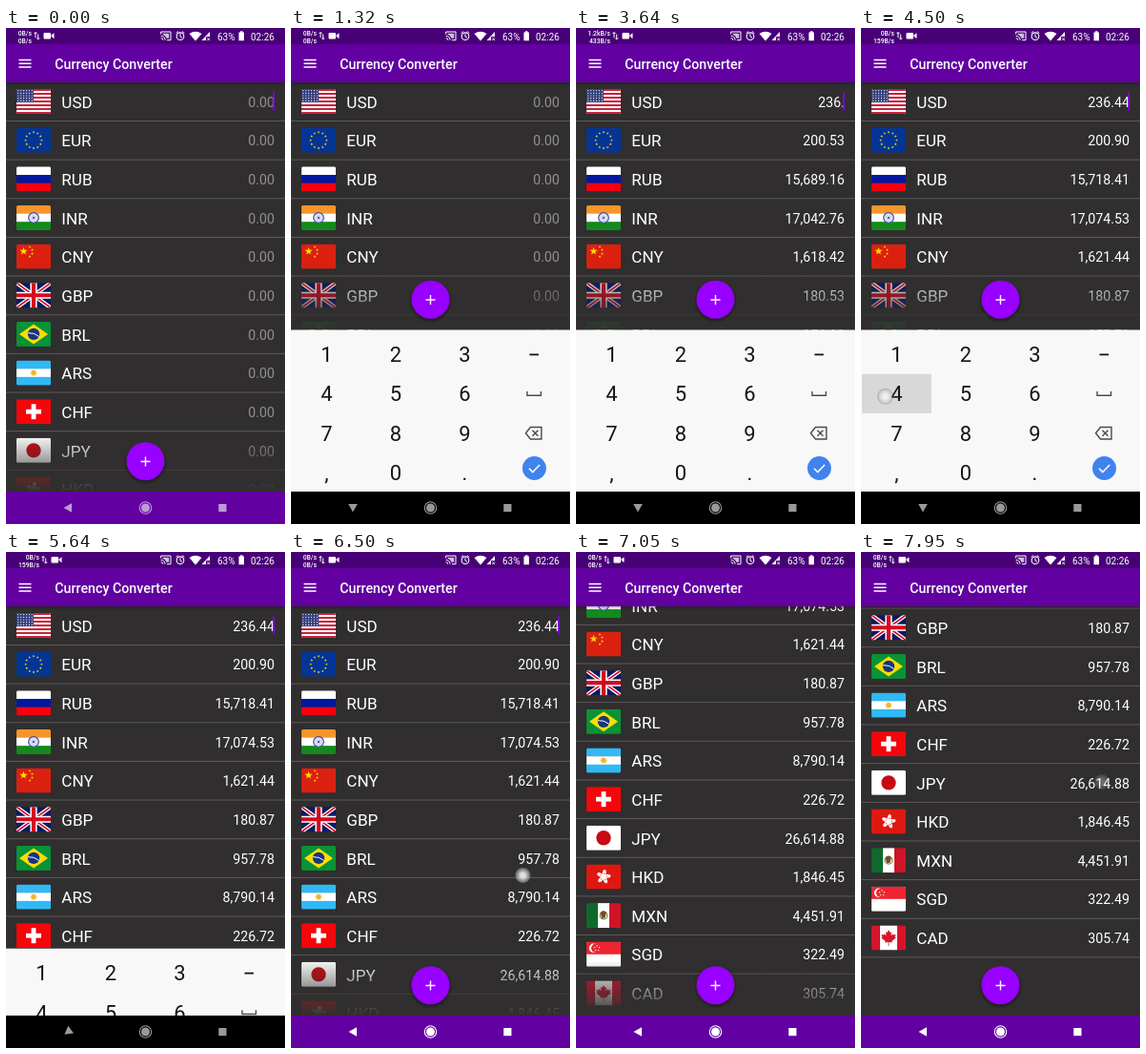
An HTML page for the animation above (8 s loop, 293 by 520 pixels).

```html
<!DOCTYPE html>
<html lang="en">
<head>
<meta charset="utf-8">
<title>Currency Converter</title>
<style>
  html, body { margin: 0; width: 100%; height: 100%; overflow: hidden; background: #302e2e; }
  svg { display: block; width: 100%; height: 100%; }
  text { font-family: Roboto, sans-serif; fill: #fff; }
  .code { font-size: 17.1px; }
  .value { font-size: 14.26px; text-anchor: end; }
  .speed { font-size: 6.8px; font-weight: 500; text-anchor: end; }
  .clock { font-size: 10px; }
  .key { font-size: 22px; text-anchor: middle; fill: #161616; }
  .line { fill: none; stroke: #fff; }
</style>
</head>
<body>
<svg id="stage" viewBox="0 0 293 520" preserveAspectRatio="none"></svg>
<script>
const LOOP = 8000, PITCH = 40.65, TOP = 57, FULL = 486, SHORT = 316.5, MAX_SCROLL = 201;
const TOTAL = 236.44;

// ---- shape helpers
const box = (x, y, w, h, fill, more = '') =>
  `<rect x="${x}" y="${y}" width="${w}" height="${h}" fill="${fill}" ${more}/>`;
const dot = (x, y, r, fill, more = '') => `<circle cx="${x}" cy="${y}" r="${r}" fill="${fill}" ${more}/>`;
const path = (d, fill, more = '') => `<path d="${d}" fill="${fill}" ${more}/>`;
const stroke = (d, color, width) => path(d, 'none', `stroke="${color}" stroke-width="${width}"`);
const range = (n, fn) => Array.from({ length: n }, (_, i) => fn(i)).join('');
const polar = (x, y, r, turn) => [x + r * Math.sin(turn * 2 * Math.PI), y - r * Math.cos(turn * 2 * Math.PI)];
const star = (x, y, r, fill) => `<polygon fill="${fill}" points="${
  range(10, i => polar(x, y, i % 2 ? r * .4 : r, i / 10).map(v => v.toFixed(2)).join() + ' ')}"/>`;
const bands = (a, b, c) => box(0, 0, 36, 9, a) + box(0, 8.7, 36, 9, b) + box(0, 17.3, 36, 9, c);
const pales = (a, b, c, side) =>
  box(0, 0, side, 26, a) + box(side, 0, 36 - 2 * side, 26, b) + box(36 - side, 0, side, 26, c);

const flags = {
  USD: box(0, 0, 36, 26, '#fff') + range(7, i => box(0, i * 4, 36, 2, '#c8233a')) + box(0, 0, 18, 14, '#35417c') +
    range(5, r => range(6, c => dot(1.8 + c * 2.9, 1.6 + r * 2.7, .6, '#fff'))),
  EUR: box(0, 0, 36, 26, '#053594') + range(12, i => star(...polar(18, 13, 8.4, i / 12), 1.5, '#f5d822')),
  RUB: bands('#fff', '#0018a0', '#f20010'),
  INR: bands('#f8952a', '#fff', '#138a1c') + dot(18, 13, 5.3, '#eef', 'stroke="#3a4a9c" stroke-width="1.2"') +
    range(12, i => stroke(`M18 13L${polar(18, 13, 5, i / 12)}`, '#9aa2d0', .4)) + dot(18, 13, 1, '#3a4a9c'),
  CNY: box(0, 0, 36, 26, '#dc2010') + star(7.5, 7.5, 4.3, '#ffdf00') +
    [[14, 2.8], [16.5, 6], [16.5, 10], [14, 13]].map(p => star(...p, 1.5, '#ffdf00')).join(''),
  GBP: box(0, 0, 36, 26, '#0a1a60') + stroke('M0 0L36 26M36 0L0 26', '#fff', 4.2) +
    stroke('M0 0L36 26M36 0L0 26', '#d4081f', 1.6) + stroke('M18 0V26M0 13H36', '#fff', 7.2) +
    stroke('M18 0V26M0 13H36', '#d4081f', 4.2),
  BRL: box(0, 0, 36, 26, '#0a9236') + path('M18 2.5L33 13L18 23.5L3 13Z', '#fedd00') +
    dot(18, 13, 6.2, '#17357f') + stroke('M12 11.8Q18.5 11.2 23.6 15.5', '#fff', 1),
  ARS: bands('#30b9f4', '#fff', '#30b9f4') + dot(18, 13, 2.5, '#f3b52b') +
    range(12, i => stroke(`M18 13L${polar(18, 13, 3.7, i / 12)}`, '#f3b52b', .6)),
  CHF: box(0, 0, 36, 26, '#f4060a') + box(15.6, 5, 4.8, 16, '#fff') + box(10, 10.6, 16, 4.8, '#fff'),
  JPY: box(0, 0, 36, 26, '#fff') + dot(18, 13, 7.7, '#c80a12'),
  HKD: box(0, 0, 36, 26, '#de1810') + range(5, i =>
    `<ellipse cx="18" cy="9.2" rx="1.9" ry="3.7" fill="#fff" transform="rotate(${i * 72 + 10} 18 13)"/>`) +
    range(5, i => dot(...polar(18, 13, 3.4, i / 5 + .03), .6, '#de1810')),
  MXN: pales('#10692c', '#fff', '#cf1428', 12) + dot(18, 13, 3.9, 'none', 'stroke="#6f8f4e" stroke-width="1.2"') +
    path('M14.500 10Q18 6.500 21 10L19.500 15.500L16 16Z', '#7a4a24'),
  SGD: box(0, 0, 36, 26, '#fff') + box(0, 0, 36, 13, '#ee2430') + dot(7.5, 6.5, 4.7, '#fff') +
    dot(9.4, 6.5, 4.4, '#ee2430') + range(5, i => star(...polar(11, 6.7, 2.6, i / 5), 1.1, '#fff')),
  CAD: pales('#d5142c', '#fff', '#d5142c', 9) +
    path('M18 4.500l1.500 3 1.600-.8-.7 4.100 2.200-2.100.5 1.300 2.500-.4-.9 2.700 1 .8-4.300 3.400.4 1.600-3.400-.5v4h-.8v-4l-3.400.5.4-1.600-4.300-3.400 1-.8-.9-2.700 2.500.4.5-1.300 2.200 2.100-.7-4.100 1.600.8z', '#d5142c')
};
const totals = {
  USD: TOTAL, EUR: 200.9, RUB: 15718.41, INR: 17074.53, CNY: 1621.44, GBP: 180.87, BRL: 957.78,
  ARS: 8790.14, CHF: 226.72, JPY: 26614.88, HKD: 1846.45, MXN: 4451.91, SGD: 322.49, CAD: 305.74
};
const codes = Object.keys(totals);

// ---- timeline: [press, release, character, column, row, pointer offset]
const presses = [
  [1720, 1810, '2', 1, 0, -4], [2100, 2200, '3', 2, 0, -4], [2480, 2590, '6', 2, 1, -5],
  [3040, 3150, '.', 2, 3, -4], [3680, 3780, '4', 0, 1, -12], [4370, 4470, '4', 0, 1, -12]
];
const speeds = [[0, '0B/s', '0B/s', 27], [2130, '1.2kB/s', '433B/s', 36], [4130, '0B/s', '159B/s', 35], [6120, '0B/s', '0B/s', 27]];
const scrollSteps = [[6510, 0], [6600, 28], [6700, 82], [6800, 112], [6920, 133], [7050, 143], [7200, 148],
  [7380, 149], [7480, 172], [7580, 192], [7680, 201]];
// [start, end, x, y(scroll)]
const touches = [
  ...presses.map(([a, b, , c, r, dx]) => [a, b + 90, keyX(c) + dx, () => keyY(r) + 3]),
  [5330, 5440, 65, () => 503],
  [6400, 6760, 243.5, s => 339 - s],
  [7370, 7975, 253, s => 241 + MAX_SCROLL - s]
];

function keyX(col) { return 37.5 + col * 72.5; }
function keyY(row) { return 342 + row * 41.3; }

const keypad = () => {
  const rows = ['123', '456', '789', ',0.'];
  return box(0, 316.5, 293, 170, '#f8f8f8') + box(0, 0, 73, 41, '#d8d8d8', 'id="pressed"') +
    rows.map((row, r) => [...row].map((ch, c) =>
      `<text class="key" x="${keyX(c)}" y="${keyY(r) + 8}">${ch}</text>`).join('')).join('') +
    box(250.5, 341.5, 9.5, 1.8, '#161616') +
    stroke('M248 381v4.300h14.500v-4.300', '#4a4a4a', 1.4) +
    stroke('M251.500 418.500H263V431H251.500L246.500 424.700ZM253.500 421.700l6 6M259.500 421.700l-6 6', '#4a4a4a', 1.4) +
    dot(255.5, 461.5, 12.5, '#4083ee') + stroke('M250 461.800l3.800 3.800 7.400-7.600', '#fff', 1.6);
};

const statusIcons = `
  <g id="left">
    <path d="M3 10V4.500M1.500 6L3 4.500 4.500 6M5.700 6.500V12M4.200 10.500L5.700 12 7.200 10.500" class="line" stroke-width="1"/>
    <rect x="11.500" y="5" width="7.500" height="6.500" rx="1" fill="#fff"/><path d="M19 8l3.500-2.700v6z" fill="#fff"/>
  </g>
  <path class="line" stroke-width="1" d="M162.700 6.500V4H173V12.700H169M162.700 8.300a4.400 4.400 0 0 1 4.400 4.400M162.700 10.600a2.100 2.100 0 0 1 2.100 2.100"/>
  <path d="M164.500 5.800h6.700v5h-2.700q-1-3-4-4z" fill="#fff" opacity=".75"/>
  <circle class="line" stroke-width="1.100" cx="183" cy="8.700" r="3.800"/>
  <path class="line" stroke-width="1" d="M183 6.200V9l2 1.200M178.700 5.500l2.300-2M187.300 5.500l-2.300-2"/>
  <path d="M192.500 6Q199 1.500 205.500 6L199 13.500Z" fill="#fff"/>
  <path d="M205.500 13L214 4V9H210V13Z" fill="#fff"/>
  <path class="line" stroke-width=".9" d="M211.300 10.300l2.700 2.700M214 10.300l-2.700 2.700"/>
  <text class="clock" x="222" y="12.900">63%</text>
  <path d="M244.500 4.500h1.600V3.300h2.400v1.200h1.500V13.300h-5.500z" fill="#fff"/>
  <text class="clock" x="257" y="12.900">02:26</text>`;

const stage = document.getElementById('stage');
stage.innerHTML = `
  <defs>
    <linearGradient id="fadeFill" x2="0" y2="1"><stop stop-color="#302e2e" stop-opacity="0"/><stop offset="1" stop-color="#302e2e"/></linearGradient>
    <linearGradient id="shade" x2="0" y2="1"><stop stop-opacity=".25"/><stop offset="1" stop-opacity="0"/></linearGradient>
    <radialGradient id="fabShade"><stop offset=".8" stop-opacity=".35"/><stop offset="1" stop-opacity="0"/></radialGradient>
    <radialGradient id="touchFill"><stop offset=".3" stop-color="#fff" stop-opacity=".85"/><stop offset=".65" stop-color="#ddd" stop-opacity=".65"/><stop offset="1" stop-color="#999" stop-opacity=".5"/></radialGradient>
    <clipPath id="flagClip"><rect width="36" height="26" rx="1.500"/></clipPath>
  </defs>
  ${box(0, 0, 293, 520, '#302e2e')}
  <g id="list">${codes.map((code, i) => `
    <g transform="translate(0 ${TOP + i * PITCH})">
      <g transform="translate(11 7)" clip-path="url(#flagClip)">${flags[code]}</g>
      <text class="code" x="58.300" y="26.700">${code}</text>
      <text class="value" x="282" y="25.700"></text>
      ${box(0, 40, 293, .9, '#605e5e')}
    </g>`).join('')}
    ${box(280.3, 67.5, 1.8, 19, '#8400f0', 'id="cursor"')}
  </g>
  ${box(0, 0, 293, 60, 'url(#fadeFill)', 'id="fade"')}
  <g id="fab">${dot(146.5, 456, 23, 'url(#fabShade)')}${dot(146.5, 454.2, 20, '#9800ff')}
    ${stroke('M141.500 454.500h10M146.500 449.500v10', '#fff', 1.4)}</g>
  <g id="keypad">${keypad()}</g>
  ${box(0, 57, 293, 4, 'url(#shade)')}
  ${box(0, 17, 293, 40, '#6200a2')}${box(0, 0, 293, 17, '#480076')}
  ${stroke('M13.500 33.500h13M13.500 37.200h13M13.500 40.900h13', '#fff', 1.5)}
  <text x="51.300" y="42.700" font-size="14.260" font-weight="500">Currency Converter</text>
  <text class="speed" id="up" y="7.800"></text><text class="speed" id="down" y="16"></text>
  ${statusIcons}
  ${box(0, 486, 293, 34, '#6200a2', 'id="nav"')}
  <g id="navIcons" fill="#fff"><path id="back" d="M60.500 503l8.500-4.800v9.600z"/>
    <circle cx="146.500" cy="503" r="4.500"/><circle class="line" cx="146.500" cy="503" r="6.200" stroke-width="1.100"/>
    <rect x="223.300" y="499" width="8.200" height="8.200"/></g>
  ${dot(0, 0, 8, 'url(#touchFill)', 'id="touch" stroke="#556" stroke-opacity=".45" stroke-width=".8"')}`;

const $ = id => document.getElementById(id);
const set = (id, attrs) => { for (const name in attrs) $(id).setAttribute(name, attrs[name]); };
const values = [...document.querySelectorAll('.value')];

// ---- motion helpers
const clamp = v => Math.min(1, Math.max(0, v));
const ramp = (t, from, to) => clamp((t - from) / (to - from));
const mix = (a, b, p) => `rgb(${a.map((v, i) => Math.round(v + (b[i] - v) * p))})`;
const latest = (table, t) => table.filter(row => row[0] <= t).pop();
function along(steps, t) {
  const next = steps.findIndex(s => s[0] > t);
  if (next < 0) return steps[steps.length - 1][1];
  if (next === 0) return steps[0][1];
  const [t0, a] = steps[next - 1], [t1, b] = steps[next];
  return a + (b - a) * (t - t0) / (t1 - t0);
}
const money = n => n.toLocaleString('en-US', { minimumFractionDigits: 2, maximumFractionDigits: 2 });

let shown = null;
function showValues(typed) {
  if (typed === shown) return;
  shown = typed;
  codes.forEach((code, i) => {
    // results are rounded up to the cent
    const cents = Math.ceil((totals[code] - .004) / TOTAL * Number(typed) * 100);
    values[i].textContent = !typed ? '0.00' : i ? money(cents / 100) : typed;
    values[i].style.fill = typed ? '#fff' : '#918f8f';
  });
}

function cursorOn(t) {
  const typed = presses.filter(p => p[1] <= t).pop();
  return Math.floor((t - (typed ? typed[1] : -180)) / 500) % 2 === 0;
}

function draw(t) {
  showValues(presses.filter(p => p[1] <= t).map(p => p[2]).join(''));

  const open = (1 - (1 - ramp(t, 50, 320)) ** 4) * (1 - ramp(t, 5450, 5700) ** 2);
  const bottom = t >= 90 && t < 5450 ? SHORT : FULL;
  const scroll = along(scrollSteps, t);
  const edge = bottom === FULL ? Math.min(60, MAX_SCROLL - scroll) : 60;
  set('list', { transform: `translate(0 ${-scroll})` });
  set('cursor', { opacity: cursorOn(t) ? 1 : 0 });
  set('fade', { y: bottom - edge, height: edge });
  set('fab', { transform: `translate(0 ${bottom - FULL})` });
  set('keypad', { transform: `translate(0 ${(1 - open) * 170})`, visibility: open > 0 ? 'visible' : 'hidden' });

  const press = presses.find(p => t >= p[0] && t < p[1] + 70);
  set('pressed', press
    ? { x: keyX(press[3]) - 36.5, y: keyY(press[4]) - 20.5, opacity: 1 }
    : { opacity: 0 });

  const dark = ramp(t, 590, 1000) - ramp(t, 5650, 6050);
  set('nav', { fill: mix([98, 0, 162], [0, 0, 0], dark) });
  set('navIcons', { opacity: .6 + .4 * ramp(t, 5900, 6140) });
  set('back', { transform: `rotate(${-90 * open} 65 503)` });

  const touch = touches.find(p => t >= p[0] && t < p[1]);
  set('touch', touch
    ? { cx: touch[2], cy: touch[3](scroll), opacity: Math.min(ramp(t, touch[0] - 20, touch[0] + 40), ramp(t, touch[1] + 10, touch[1] - 90)) }
    : { opacity: 0 });

  const [, up, down, right] = latest(speeds, t);
  $('up').textContent = up;
  $('down').textContent = down;
  set('up', { x: right });
  set('down', { x: right });
  set('left', { transform: `translate(${right + 1} 0)` });
}

const start = performance.now();
function tick() {
  draw((performance.now() - start) % LOOP);
  requestAnimationFrame(tick);
}
tick();
</script>
</body>
</html>
```
